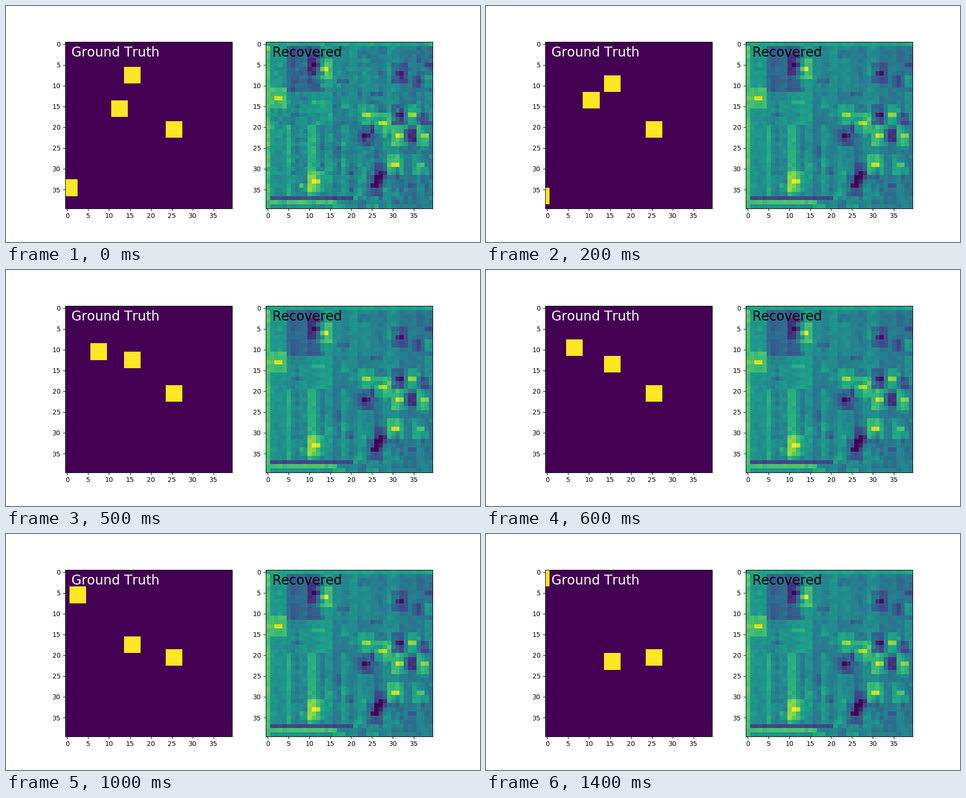
These frames come from a looping animation (1000 by 500 pixels, 1.5 s). A matplotlib script:

```python
import numpy as np
import matplotlib.pyplot as plt
from matplotlib.animation import FuncAnimation

SIZE = 40
FRAMES = 15
BLOCK = 4

# Block start (row, col) and its velocity per frame
BLOCKS = [
    ((6, 14), (1, 0)),
    ((14, 11), (-1, -1)),
    ((19, 24), (0, 0)),
    ((33, -1), (1, -1)),
]

# Strongest spots (row, col) of the recovered field
PEAKS = [(6, 13), (13, 2), (17, 23), (19, 27), (17, 34), (22, 31), (22, 37),
         (29, 30), (29, 36), (33, 11)]
PITS = [(5, 11), (7, 31), (17, 31), (22, 23), (31, 27), (34, 25)]


def truth(step):
    image = np.zeros((SIZE, SIZE))
    for start, velocity in BLOCKS:
        row, col = np.array(start) + step * np.array(velocity)
        image[max(row, 0):max(row + BLOCK, 0),
              max(col, 0):max(col + BLOCK, 0)] = 1
    return image


def add_spot(field, row, col, strength):
    field[row - 2:row + 3, col - 1:col + 3] += .4 * strength
    field[row:row + 1, col:col + 2] += .6 * strength


def make_field(rng):
    # Greener on the left, bluer on the right, with a blue band at upper left
    field = np.tile(np.linspace(.54, .42, SIZE), (SIZE, 1))
    field[1:12, 5:13] -= .16

    # Streaks along columns, drawn afresh in each band of rows
    for top, bottom in [(1, 12), (12, 20), (20, 37)]:
        pairs = np.repeat(rng.normal(0, .04, SIZE // 2), 2)
        field[top:bottom] += pairs + rng.normal(0, .02, SIZE)

    # Small patches whose contrast grows to the right
    for _ in range(150):
        row, col = rng.integers(1, SIZE, 2)
        height, width = rng.integers(1, 4, 2)
        spread = .03 + .08 * col / SIZE
        field[row:row + height, col:col + width] += rng.normal(0, spread)

    field[20:37, [5, 10, 11, 12]] += .12
    field[:, 0] = .72
    field[0] = .57
    field[37, 1:21] = .21
    field[38, :17] = .70
    for spot in PEAKS:
        add_spot(field, *spot, .42)
    for spot in PITS:
        add_spot(field, *spot, -.38)
    return field + rng.normal(0, .02, field.shape)


rng = np.random.default_rng(7)
settled = make_field(rng)
residual = rng.normal(0, .03, (SIZE, SIZE))


def recovered(step):
    return np.clip(settled + residual * np.exp(-2 * step), 0, 1)


def show_panel(ax, image, title, color):
    artist = ax.imshow(image, cmap="viridis", vmin=0, vmax=1)
    ax.text(1, 3, title, color=color, fontsize=20)
    ax.set_xticks(range(0, SIZE, 5))
    ax.set_yticks(range(0, SIZE, 5))
    return artist


plt.rcParams["font.family"] = "DejaVu Sans"
plt.rcParams["text.kerning_factor"] = 6  # whole-pixel kerning
fig, (left_ax, right_ax) = plt.subplots(1, 2, figsize=(10, 5), dpi=100)
truth_image = show_panel(left_ax, truth(0), "Ground Truth", "white")
recovered_image = show_panel(right_ax, recovered(0), "Recovered", "black")


def update(step):
    truth_image.set_data(truth(step))
    recovered_image.set_data(recovered(step))
    return truth_image, recovered_image


animation = FuncAnimation(fig, update, frames=FRAMES, interval=100, repeat=True)
plt.show()
```
